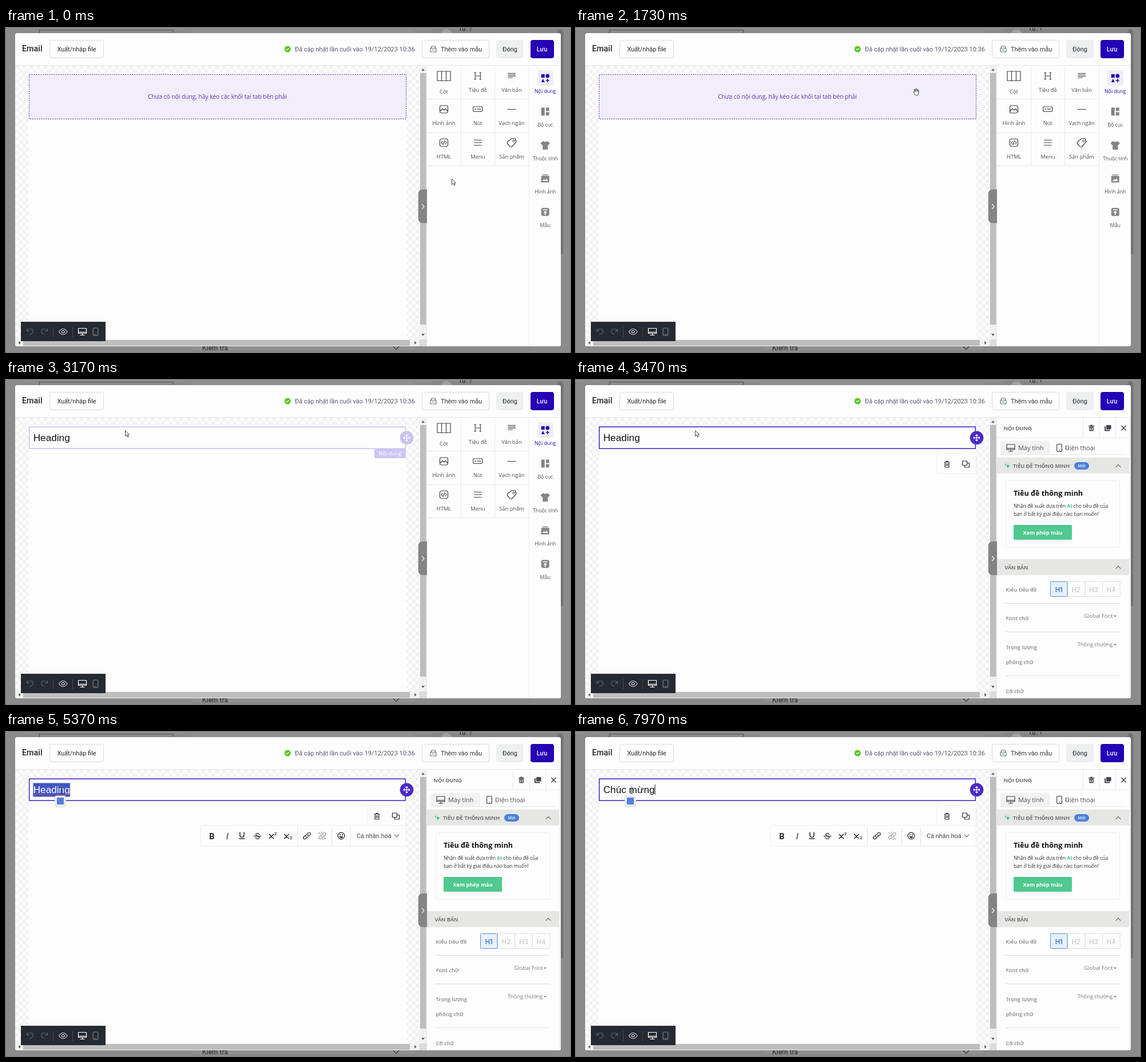
Animation, 986 px wide and 568 px high, one loop 8000 ms. Source, as an HTML page:

```html
<!DOCTYPE html>
<html lang="vi">
<head>
<meta charset="utf-8">
<title>Email editor</title>
<style>
html, body { margin: 0; width: 100%; height: 100%; overflow: hidden; background: #8c8c8c; }
svg { display: block; width: 986px; height: 568px; }
text { white-space: pre; }
.os { font-family: "Open Sans", sans-serif; }
.ro { font-family: Roboto, sans-serif; }
.ar { font-family: "Liberation Sans", Arial, sans-serif; }
.in { font-family: Inter, sans-serif; }
.line { fill: none; stroke-width: 1.2; stroke-linecap: round; stroke-linejoin: round; }
.empty, .hovered, .selected, .editing, .marked, .tiles, .undo, .heading,
.arrow, .hand, .beam, .translate { animation: 8s step-end infinite; }
.empty { animation-name: empty; }
.hovered { animation-name: hovered; }
.selected { animation-name: selected; }
.tiles { animation-name: tiles; }
.undo { animation-name: undo; }
.heading { animation-name: heading; }
.editing { animation-name: editing; }
.marked { animation-name: marked; }
.translate { animation-name: translate; }
.arrow { animation-name: arrow; }
.hand { animation-name: hand; }
.beam { animation-name: beam; }
.tileHover { animation: tileHover 8s step-end infinite; }
.cursor { animation: cursor 8s ease-in-out infinite; }
@keyframes empty { 0% { visibility: visible } 30.6%, to { visibility: hidden } }
@keyframes hovered { 0% { visibility: hidden } 30.6% { visibility: visible } 40.6%, to { visibility: hidden } }
@keyframes selected { 0% { visibility: hidden } 40.6%, to { visibility: visible } }
@keyframes tiles { 0% { visibility: visible } 40.6%, to { visibility: hidden } }
@keyframes undo { 0% { stroke: #60646b } 30.6%, to { stroke: #c9cbd0 } }
@keyframes heading { 0% { visibility: hidden } 30.6% { visibility: visible } 74.4%, to { visibility: hidden } }
@keyframes editing { 0% { visibility: hidden } 54%, to { visibility: visible } }
@keyframes marked { 0% { visibility: hidden } 58% { visibility: visible } 74.4%, to { visibility: hidden } }
@keyframes translate { 0% { visibility: hidden } 60%, to { visibility: visible } }
@keyframes arrow { 0% { visibility: visible } 4.5% { visibility: hidden } 30.6% { visibility: visible } 51%, to { visibility: hidden } }
@keyframes hand { 0% { visibility: hidden } 4.5% { visibility: visible } 30.6%, to { visibility: hidden } }
@keyframes beam { 0% { visibility: hidden } 51%, to { visibility: visible } }
@keyframes tileHover {
  0% { visibility: hidden }
  4.5% { visibility: visible; transform: translate(0, 117px) }
  6.6% { visibility: visible; transform: translate(59.5px, 58.5px) }
  8.8% { visibility: visible; transform: translate(59.5px, 0) }
  17%, to { visibility: hidden }
}
@keyframes cursor {
  0%, 2% { transform: translate(779px, 264px) }
  11%, 16% { transform: translate(817px, 113px) }
  28%, 34% { transform: translate(321.5px, 111px) }
  39.5%, 45% { transform: translate(208px, 88px) }
  53%, to { transform: translate(97px, 103px) }
}
</style>
</head>
<body>
<svg id="stage" viewBox="0 0 986 568" xmlns="http://www.w3.org/2000/svg"></svg>
<script>
const LOOP = 8000;
const stage = document.getElementById('stage');

const rect = (x, y, w, h, fill, more = '') =>
  `<rect x="${x}" y="${y}" width="${w}" height="${h}" fill="${fill}" ${more}/>`;
const text = (x, y, size, fill, str, font = 'os', more = '') =>
  `<text x="${x}" y="${y}" font-size="${size}" fill="${fill}" class="${font}" ${more}>${str}</text>`;
const path = (d, stroke, more = '') => `<path class="line" d="${d}" stroke="${stroke}" ${more}/>`;
const at = (x, y, body, more = '') => `<g transform="translate(${x} ${y})" ${more}>${body}</g>`;
const group = (name, body) => `<g class="${name}">${body}</g>`;
const MID = 'text-anchor="middle"', SEMI = 'font-weight="600"', BOLD = 'font-weight="700"';
const INK = '#3f434a', LILAC = '#e9e7f2', GREY = '#858585';

const trash = c => path('M-4.5-3.5h9M-1.5-3.5v-1.7h3v1.7M-3.5-3.5v9h7v-9M-1.2-1v4M1.2-1v4', c);
const monitor = c => path('M-7-5.5H7V3.5H-7zM-7 1.3H7M0 3.5v3M-3.5 6.5h7', c);
const phone = c => path('M-3-6.5h6q1.3 0 1.3 1.3V5q0 1.3-1.3 1.3h-6Q-4.3 6.3-4.3 5V-5.2Q-4.3-6.5-3-6.5zM-.5 4h1', c);
const moveIcon = path('M-5.5 0h11M0-5.5v11M-3.8-1.8-5.5 0l1.7 1.8M3.8-1.8 5.5 0 3.8 1.8M-1.8-3.8 0-5.5l1.8 1.7M-1.8 3.8 0 5.5l1.8-1.7', '#fff');
const turn = name => path('M-5.5-4.5v4h4M-5-1.5Q-2-5.5 2.5-4.2 6-2.5 5 1.5 3.5 5-1 5', '#60646b', `class="line ${name}"`);
const chevron = (x, y, s, c) => at(x, y, path(`M-${s} ${s / 2}L0-${s / 2} ${s} ${s / 2}`, c));
const down = (x, y, s, c) => at(x, y, path(`M-${s}-${s / 2}L0 ${s / 2} ${s}-${s / 2}`, c));
const caretDown = (x, y, c = '#777') => `<path d="M${x - 2.5} ${y - 1.2}h5l-2.5 2.8z" fill="${c}"/>`;

function backdrop() {
  return rect(0, 0, 986, 568, '#8b8b8b') +
    rect(0, 0, 986, 2, '#929292') + rect(324, 0, 390, 568, '#909090') +
    rect(745, 2, 221, 20, '#858585') + rect(964, 2, 10, 396, '#717171', 'rx="5"') +
    path('M58.5 9V3.5H292.5V9', '#444', 'stroke-dasharray="2 1.5"') +
    '<circle cx="770" cy="12" r="10" fill="#a0a0a8"/>' +
    text(791, 5, 11, '#333', 'Từ: ?', 'ro', 'font-weight="500"') +
    text(343, 564.5, 12, '#3c3c3c', 'Kiểm tra', 'ro', 'font-weight="500"') +
    down(682, 561, 5, '#444') + rect(324, 565.5, 390, 1, '#7b7b84');
}

function header() {
  const box = (x, y, w, h, fill, stroke) => rect(x, y, w, h, fill, `rx="3" stroke="${stroke}"`);
  return rect(16, 9, 954, 549, '#fdfdfd', 'rx="3"') +
    text(28, 41.3, 14.3, '#24272d', 'Email', 'ro', 'font-weight="500"') +
    box(76.5, 21.5, 94, 31, '#fff', '#d7d9e0') + text(123.5, 41, 10.95, '#24272d', 'Xuất/nhập file', 'ro', MID) +
    '<circle cx="492.300" cy="37" r="5.500" fill="#55c51f"/>' + path('M490 37l1.700 1.700 3-3.200', '#fff') +
    text(505, 41, 10.95, '#555b66', 'Đã cập nhật lần cuối vào 19/12/2023 10:36', 'ro') +
    box(727.5, 21.5, 117, 31, '#fff', '#d7d9e0') +
    at(747, 37, path('M-5-1.500h10V3Q5 5 3 5H-3Q-5 5-5 3zM-4-1.500l1-3.500h6l1 3.500M-2 1.500h4', '#5c7564')) +
    text(760, 41, 10.95, '#30343b', 'Thêm vào mẫu', 'ro') +
    box(857.5, 21.5, 47, 31, '#eef0f0', '#eef0f0') + text(881, 41, 10.95, '#24272d', 'Đóng', 'ro', MID) +
    box(917.5, 21.5, 40, 31, '#2600b8', '#1d0093') +
    text(937, 41, 10.95, '#fff', 'Lưu', 'ro', MID + ' font-weight="500"') +
    rect(16, 65, 954, 1, LILAC);
}

function canvasArea() {
  const arrow = (x, y, angle) => `<path d="M-3 1.700h6L0-1.700z" fill="#555" transform="translate(${x} ${y}) rotate(${angle})"/>`;
  return rect(16, 66, 707, 480, 'url(#checker)') + rect(40, 81, 660, 465, '#fdfdfd') +
    rect(723, 66, 12, 480, '#f1f1f1') + rect(724, 79, 10.5, 441, '#bebebe') +
    arrow(729, 73, 0) + arrow(729, 538, 180) +
    rect(16, 546, 707, 12, '#f1f1f1') + rect(30, 547, 676, 10, '#bebebe') +
    arrow(23, 552, -90) + arrow(716, 552, 90) + rect(723, 546, 12, 12, '#dcdcdc') +
    rect(735, 66, 1, 492, '#e9e9ee');
}

function bottomBar() {
  const sep = x => rect(x, 524, 1, 18, '#454951');
  return rect(26, 515, 148, 34, '#252932') +
    at(42, 532, turn('undo')) + at(67, 532, turn(''), 'transform-origin="0 0"').replace('translate(67 532)', 'translate(67 532) scale(-1 1)') +
    sep(82) + sep(116) +
    at(99.8, 532.5, path('M-7.500 0Q0-10 7.500 0 0 10-7.500 0z', '#c9cbd0') + '<circle r="2.300" fill="none" stroke="#c9cbd0" stroke-width="1.300"/>') +
    at(133.5, 532, monitor('#fff')) + at(156.5, 532.5, phone('#7f838b'));
}

function tilePanel() {
  const icons = [
    path('M-11.500-8H11.500V8.500H-11.500zM-4-8V8.500M4-8V8.500', INK),
    path('M-4.500-6v12M4.500-6v12M-4.500 0h9M-6-6h3M3-6h3M-6 6h3M3 6h3', INK),
    path('M-6.500-4.500h13M-6.500-2h13M-6.500.500h13M-6.500 3h8', INK),
    path('M-4-6.500h8Q7-6.500 7-4v8Q7 6.500 4 6.500h-8Q-7 6.500-7 4v-8Q-7-6.500-4-6.500zM-6.500 3l4-4 3 2.500L3-1l3.500 4', INK),
    path('M-6.500-4.500h13q1.500 0 1.500 1.500v5.500q0 1.500-1.500 1.500h-13Q-8 4-8 2.500V-3q0-1.500 1.500-1.500zM-5-.300h1.500M-1-.300h6', INK),
    path('M-7.500 0h15', INK),
    path('M-4-6.500h8Q7-6.500 7-4v8Q7 6.500 4 6.500h-8Q-7 6.500-7 4v-8Q-7-6.500-4-6.500zM-2.500-2.500-4.500 0l2 2.500M2.500-2.500l2 2.500-2 2.500M1-3.500-1 3.500', INK),
    path('M-6.500-4.500h13M-6.500 0h13M-6.500 4.500h13', INK),
    path('M0-7.500H6L8-1.500 0 7.500-3 7-8 1-7.500-1z', INK) + '<circle cx="3.500" cy="-3" r="1.700" fill="none" stroke="#3f434a"/>'
  ];
  const names = ['Cột', 'Tiêu đề', 'Văn bản', 'Hình ảnh', 'Nút', 'Vạch ngăn', 'HTML', 'Menu', 'Sản phẩm'];
  const rail = [
    ['Nội dung', '<path d="M-7-7h6v6h-6zM-7 7l3-6 3 6z"/><circle cx="4" cy="-4" r="3.500"/><path d="M3.200 1h1.600v2.200H7v1.600H4.800V7H3.200V4.800H1V3.200h2.200z"/>'],
    ['Bố cục', '<path d="M-7-7h6V7h-6zM1-7h6v6H1zM1 1h6v6H1z"/>'],
    ['Thuộc tính', '<path d="M-3-7Q0-4 3-7L8-4 6 0 4.500-.500V8h-9V-.500L-6 0-8-4z"/>'],
    ['Hình ảnh', '<path d="M-5-7H5v1.500H-5zM-7-4.500H7V7H-7z"/><path d="M-5 4.500-2 1 0 3l2-3 3 4.500z" fill="#fdfdfd"/>'],
    ['Mẫu', '<rect x="-7" y="-7" width="14" height="14" rx="3"/><path d="M-4-4.500h8v1.500h-8zM0-2 3.500 1.500H1V5h-2V1.500h-2.500z" fill="#fdfdfd"/>']
  ];
  const cell = (i, draw) => draw(765.5 + i % 3 * 59.3, 66 + Math.floor(i / 3) * 58.5);
  return rect(736, 66, 234, 492, '#fdfdfd') +
    rect(736, 67, 59, 57, '#eeeeeb', 'class="tileHover"') +
    [124, 183, 241].map(y => rect(736, y, 178, 1, LILAC)).join('') +
    [795, 854].map(x => rect(x, 66, 1, 176, LILAC)).join('') + rect(914, 66, 1, 492, LILAC) +
    names.map((name, i) => cell(i, (x, y) => at(x, y + 18, icons[i]) +
      text(x, y + (i ? 45.5 : 49), 9.4, '#4e5056', name, 'os', MID))).join('') +
    rect(929, 74, 28, 27, '#efedf8', 'rx="3"') +
    rail.map(([name, icon], i) => at(942.7, 88 + i * 58.6, icon, `fill="${i ? GREY : '#2609b5'}"`) +
      text(942.7, 114.4 + i * 58.6, 8.8, i ? '#505257' : '#2609b5', name, 'os', MID)).join('');
}

function settingsPanel() {
  const section = (y, x, name) => rect(736, y, 231, 28, '#e6e6e4') +
    text(x, y + 17.5, 9.35, '#55585d', name, 'os', SEMI) + chevron(948, y + 14.5, 4, '#777');
  const label = (y, name) => text(751.5, y, 9.4, GREY, name, 'os', SEMI);
  const value = (y, name) => text(938.5, y, 9.4, '#77797d', name, 'os', 'text-anchor="end"') + caretDown(942.5, y - 3);
  const level = i => rect(859.5 + (i - 2) * 30.5, 353.5, 30.5, 26, '#fdfdfd', 'stroke="#e0e0e3"') +
    text(874.5 + (i - 2) * 30.5, 372, 11.3, '#c6c8cc', 'H' + i, 'in', MID + ' font-weight="500"');
  return rect(736, 66, 234, 492, '#fdfdfd') + rect(967, 66, 3, 492, '#f3f3f5') +
    text(747.5, 87.5, 9.7, '#4b4e54', 'NỘI DUNG', 'os', SEMI) +
    [886, 915, 943].map(x => rect(x, 66, 1, 35, '#e9e9ec')).join('') + rect(736, 101, 231, 1, '#ededf0') +
    at(901, 84, '<path d="M-5-4h2.500l1-1.500h3l1 1.500H5v1.500H-5zM-4-2h8l-.500 7.500h-7z" fill="#4b4e54"/>' + path('M-1.500 0v3.500M1.500 0v3.500', '#fdfdfd')) +
    at(929.5, 84, rect(-2.5, -5, 8.5, 7.5, '#43464c', 'rx="1"') + path('M-4.500-2v6.500H3', '#43464c', 'style="stroke-width:2"')) +
    at(957.5, 84, path('M-3.800-3.800l7.600 7.600M3.800-3.800l-7.600 7.600', '#33363b', 'style="stroke-width:1.500"')) +
    rect(742, 107, 87, 23, '#f2f2f2') + rect(742, 130, 220, 1, '#e6e6e8') +
    at(760, 118.5, monitor(INK)) + text(773, 122.7, 10.95, '#4e5157', 'Máy tính') +
    at(845, 119, phone(INK)) + text(855, 122.7, 10.95, '#4e5157', 'Điện thoại') +
    section(136, 764, 'TIÊU ĐỀ THÔNG MINH') +
    '<path d="M755 147l1.200 2.800 2.800 1.200-2.800 1.200-1.200 2.800-1.200-2.800-2.800-1.200 2.800-1.200zM751 146l.700 1.300 1.300.700-1.300.700-.700 1.300-.700-1.300-1.300-.700 1.300-.700z" fill="#45c488"/>' +
    rect(871, 144, 26, 13, '#4b80dc', 'rx="6.5"') + text(884, 153, 7, '#fff', 'Mới', 'os', MID + SEMI.replace(/^/, ' ')) +
    rect(751.5, 176.5, 199, 117, '#fdfdfd', 'rx="3" stroke="#eeeef0"') +
    text(765, 203, 12.5, '#111', 'Tiêu đề thông minh', 'os', BOLD) +
    text(765, 223.5, 8.65, '#2d2f33', 'Nhận đề xuất dựa trên <tspan fill="#3fc389" font-weight="700">AI</tspan> cho tiêu đề của') +
    text(765, 238, 8.65, '#2d2f33', 'bạn ở bất kỳ giai điệu nào bạn muốn!') +
    rect(765, 254, 102, 26, '#50c990', 'rx="1.5"') + text(816, 270.8, 9.2, '#fff', 'Xem phép màu', 'os', MID + ' ' + BOLD) +
    section(314, 749.5, 'VĂN BẢN') + label(370.5, 'Kiểu tiêu đề') + [2, 3, 4].map(level).join('') +
    rect(829.5, 353.5, 29.5, 26, '#e8f1fb', 'rx="2" stroke="#4f8edb"') +
    text(844.3, 372, 11.3, '#3b7fd6', 'H1', 'in', MID + ' ' + SEMI) +
    [391, 441, 518].map(y => rect(751, y, 200, 1, '#dedede')).join('') +
    label(421, 'Font chữ') + value(417, 'Global Font') +
    label(471.5, 'Trọng lượng') + label(498, 'phông chữ') + value(467, 'Thông thường') + label(548.5, 'Cỡ chữ');
}

function formatBar() {
  const sep = x => rect(x, 166, 1, 33, '#e4e4e8');
  const glyph = (x, str, more = '') => text(x, 187.5, 14.5, '#25282d', str, 'ro', MID + ' ' + more);
  const link = c => path('M-1.500 1.500Q-3 0-1.200-1.800L2-5Q4-6.500 5.500-5 7-3.500 5.300-1.500L3.500.300M1.500-1.500Q3 0 1.200 1.800L-2 5Q-4 6.500-5.500 5-7 3.500-5.300 1.500L-3.500-.300', c);
  const small = (x, y, str) => text(x, y, 8, '#25282d', str, 'ro', 'font-weight="500"');
  const cross = x => at(x, 183, path('M-3.800-3.800l7.600 7.600M3.800-3.800l-7.600 7.600', '#25282d', 'style="stroke-width:1.500"'));
  return rect(340, 163.5, 359, 37, '#fdfdfd', 'rx="3" stroke="#eeeef1"') +
    glyph(360, 'B', BOLD) + glyph(387, 'I', 'font-style="italic" font-family="serif"') +
    at(412.5, 181, path('M-3.500-5v5Q-3.500 3.300 0 3.300T3.500 0V-5M-4.500 6h9', '#25282d', 'style="stroke-width:1.500"')) +
    glyph(439.5, 'S') + rect(433, 182, 13.5, 1.2, '#25282d') +
    cross(464) + small(469, 181, '2') + cross(490.5) + small(496, 188, '2') +
    sep(509) + at(526, 182, link('#25282d')) +
    at(553, 182, link('#9b9da2') + path('M-6-5.500-3-3M-1-7v2M6 5.500 3 3M1 7V5', '#9b9da2')) + sep(569) +
    at(586, 182, '<circle r="5.800" fill="none" stroke="#25282d" stroke-width="1.300"/><path d="M-3.500 1h7Q2.500 4 0 4T-3.500 1z" fill="#25282d"/><circle cx="-2" cy="-1.800" r="1"/><circle cx="2" cy="-1.800" r="1"/>') +
    sep(602) + text(613, 186, 10.95, '#42464d', 'Cá nhân hoá', 'ro') + down(683, 182, 3.7, '#666');
}

function blocks() {
  const frame = (c, w) => rect(40.7, 82.2, 657.6, 38, '#fdfdfd', `stroke="${c}" stroke-width="${w}"`) +
    `<circle cx="700.500" cy="101.300" r="11.800" fill="${c}"/>` + at(700.5, 101.3, moveIcon);
  return group('empty', rect(40.5, 81.5, 659, 78, '#f1edfa', 'stroke="#6a3fc4" stroke-dasharray="2.3 1.6"') +
      text(369.5, 123.5, 10.18, '#5b35b5', 'Chưa có nội dung, hãy kéo các khối tại tab bên phải', 'os', MID)) +
    group('hovered', frame('#cbc2f2', 1.5) + rect(644, 120, 55, 17, '#cdc5f3') +
      text(671.3, 131.5, 9.4, '#fff', 'Nội dung', 'os', MID)) +
    group('selected', frame('#4a29c9', 1.6) +
      '<path d="M631 128.500H679L685 124.500 691 128.500H699.500V163.500H631z" fill="#fdfdfd" stroke="#ececf0"/>' +
      at(648.5, 147.5, trash('#25282d')) +
      at(681.5, 147.5, path('M-6-5.500h8v7.500h-8zM2-2h4v7.500h-8V2', '#25282d'))) +
    group('heading', text(47.7, 107, 17.2, '#111', 'Heading', 'ar')) +
    group('editing', formatBar()) +
    group('marked', rect(47.5, 89.5, 64.5, 24, '#4156c4') + text(47.7, 107, 17.2, '#fff', 'Heading', 'ar') +
      path('M48 109.500H111', '#b03a6a')) +
    text(47.7, 107, 17.2, '#111', '', 'ar', 'id="typed"') + rect(0, 92, 1, 18, '#111', 'id="caret"') +
    group('translate', rect(85.5, 112, 19, 19, '#ececec', 'rx="3" stroke="#dedee2"') + rect(89, 115, 12, 12, '#5080e0'));
}

function pointer() {
  return group('cursor',
    group('arrow', '<path d="M.500.500V10.500L2.900 8.400 4.600 12 6.200 11.200 4.500 7.800H7.500z" fill="#fff" stroke="#333" stroke-width=".9"/>') +
    group('hand', '<path d="M-5 0q1-1.200 2.300.300L-4-4q.8-1.300 1.700.2l1 2.600-.4-4q1-1.100 1.800.1l.4 3.800.6-3.400q1-.9 1.600.2l-.3 3.700.8-1.800q1-.5 1.300.5l-.6 4.400q-.4 2-1.400 3.400H-1.800Q-2.600 3.300-5 0z" fill="#fff" stroke="#333" stroke-width=".9"/>') +
    group('beam', path('M-2-5H-.700L0-4.300.700-5H2M0-4.300V4.300M-2 5H-.700L0 4.300.700 5H2', '#444')));
}

stage.innerHTML = `<defs><pattern id="checker" x="16" y="66" width="12.500" height="12.500" patternUnits="userSpaceOnUse">
  ${rect(0, 0, 12.5, 12.5, '#fdfdfd') + rect(0, 0, 6.25, 6.25, '#f2f2f2') + rect(6.25, 6.25, 6.25, 6.25, '#f2f2f2')}
  </pattern><clipPath id="modal"><rect x="16" y="9" width="954" height="549" rx="3"/></clipPath></defs>` +
  backdrop() + `<g clip-path="url(#modal)">` + header() + canvasArea() +
  group('tiles', tilePanel()) + group('selected', settingsPanel()) +
  rect(720.5, 283, 30, 59, '#858585', 'rx="8" style="clip-path:inset(0 14.5px 0 0)"') +
  path('M727.500 309l3.500 4-3.500 4', '#f2f2f2') +
  blocks() + bottomBar() + '</g>' + pointer();

const typed = document.getElementById('typed');
const caret = document.getElementById('caret');
const keys = [[5950, 'C'], [6100, 'Ch'], [6300, 'Chu'], [6480, 'Chuc'], [6760, 'Chúc'], [6950, 'Chúc '],
  [7120, 'Chúc m'], [7270, 'Chúc mu'], [7420, 'Chúc mun'], [7570, 'Chúc mung'], [7750, 'Chúc mừng']];

function tick() {
  const now = performance.now() % LOOP;
  const entry = keys.filter(([time]) => time <= now).pop();
  const value = entry ? entry[1] : '';
  if (typed.textContent !== value) typed.textContent = value;
  caret.setAttribute('x', 47.7 + (value ? typed.getComputedTextLength() : 0));
  caret.setAttribute('visibility', value ? 'visible' : 'hidden');
  requestAnimationFrame(tick);
}
tick();
</script>
</body>
</html>
```
